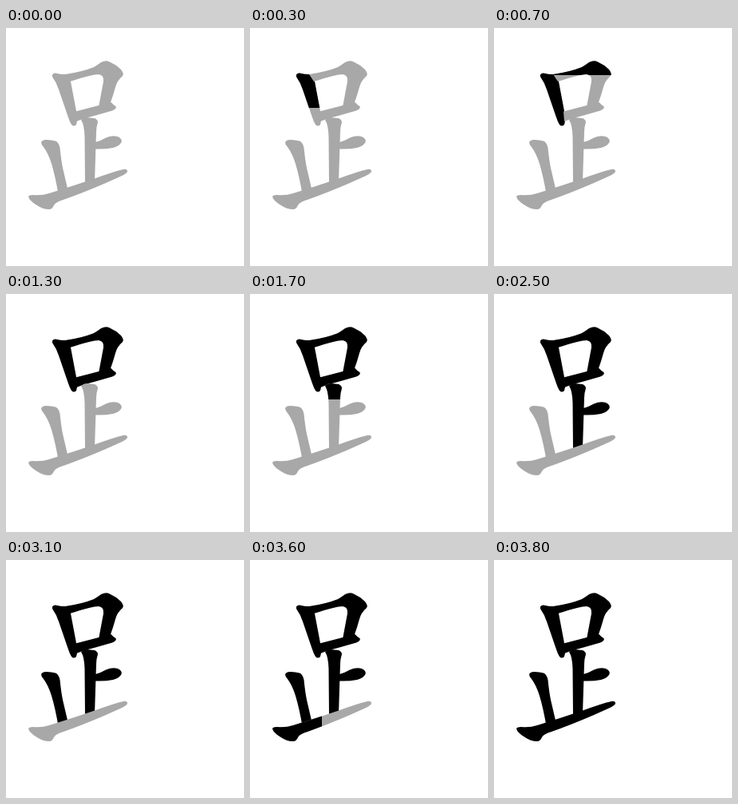
An HTML page with a canvas for the animation above (4.2 s loop, 298 by 298 pixels).

```html
<!DOCTYPE html>
<html lang="en">
<head>
<meta charset="utf-8">
<title>Stroke order</title>
<style>
  html, body { margin: 0; width: 100%; height: 100%; overflow: hidden; background: #fff; }
  canvas { display: block; width: 298px; height: 298px; }
</style>
</head>
<body>
<canvas id="stage" width="298" height="298"></canvas>
<script>
const SIZE = 298, LOOP = 4200, STEP = 100;
const ctx = document.getElementById('stage').getContext('2d');

const right = x => [x, SIZE];
const down = y => [SIZE, y];
const whole = [SIZE, SIZE];

// Each stroke is revealed in steps; a step gives the right and bottom limits of the ink.
const strokes = [
  { start: 200, steps: [down(78), down(100), whole],
    d: 'M58 59Q58 57 62 56.5Q70 58.5 77 58L81 67L88 104L89.5 112Q89 118 88 121Q85 124 82 121Q80 118 78 112L66 77Q63 68 58 61Z' },
  { start: 600, steps: [right(113), down(59), down(79), whole],
    d: 'M74 58Q95 55 110 49Q115 46 119 43Q125 40 130 42.5Q138 46 144 52Q148 57 146 60Q139 66 137 74Q134 85 131 93L130 97L116 99L122 67Q123 59 116 58Q108 58 80 67Z' },
  { start: 1200, steps: [right(113), whole],
    d: 'M87 104.5L116 97L131 92.5Q134 96 137.5 98Q139 101 133 103.5L112 109.5L99 113Q93 115 88 117Z' },
  { start: 1700, steps: [down(132), down(152), down(171), whole],
    d: 'M94 115Q97 112 101 112L111 113Q115 115 115 118Q113 124 113 130L111 193L99 196L98.5 136Q98 121 94 115Z' },
  { start: 2400, steps: [right(128), whole],
    d: 'M112 143Q119 141 125 137.5Q133 134 140 136Q146 139 144.5 143Q142 148 134 150Q124 152 112 151.5Z' },
  { start: 2900, steps: [down(160), down(182), whole],
    d: 'M44 143Q46 139.5 51 140Q57 140 62 141.5Q66 143 67.5 150Q69 165 71 175L78 205L65.5 208Q62 187 57 170Q53 157 47 149Q44 146 44 143Z' },
  { start: 3500, steps: [right(59), right(90), right(121), whole],
    d: 'M28 211Q29 209 34 209Q45 210 54 207Q80 199 111 188.5Q134 180 147 177Q152 176 152 180Q150 183 143 186L124 194.5Q96 206.5 72 215Q62 218 60 222Q58 227 54 227Q46 227 38 221.5Q29 216 28 211Z' }
].map(stroke => ({ ...stroke, path: new Path2D(stroke.d) }));

function fill(path, color) {
  ctx.fillStyle = color;
  ctx.fill(path);
}

function draw(time) {
  ctx.fillStyle = '#fff';
  ctx.fillRect(0, 0, SIZE, SIZE);
  for (const { start, steps, path } of strokes) {
    const index = Math.min(Math.floor((time - start) / STEP), steps.length - 1);
    if (index < steps.length - 1) fill(path, '#a8a8a8');
    if (index < 0) continue;
    ctx.save();
    ctx.beginPath();
    ctx.rect(0, 0, ...steps[index]);
    ctx.clip();
    fill(path, '#000');
    ctx.restore();
  }
}

const origin = performance.now();
function tick() {
  draw((performance.now() - origin) % LOOP);
  requestAnimationFrame(tick);
}
tick();
</script>
</body>
</html>
```
